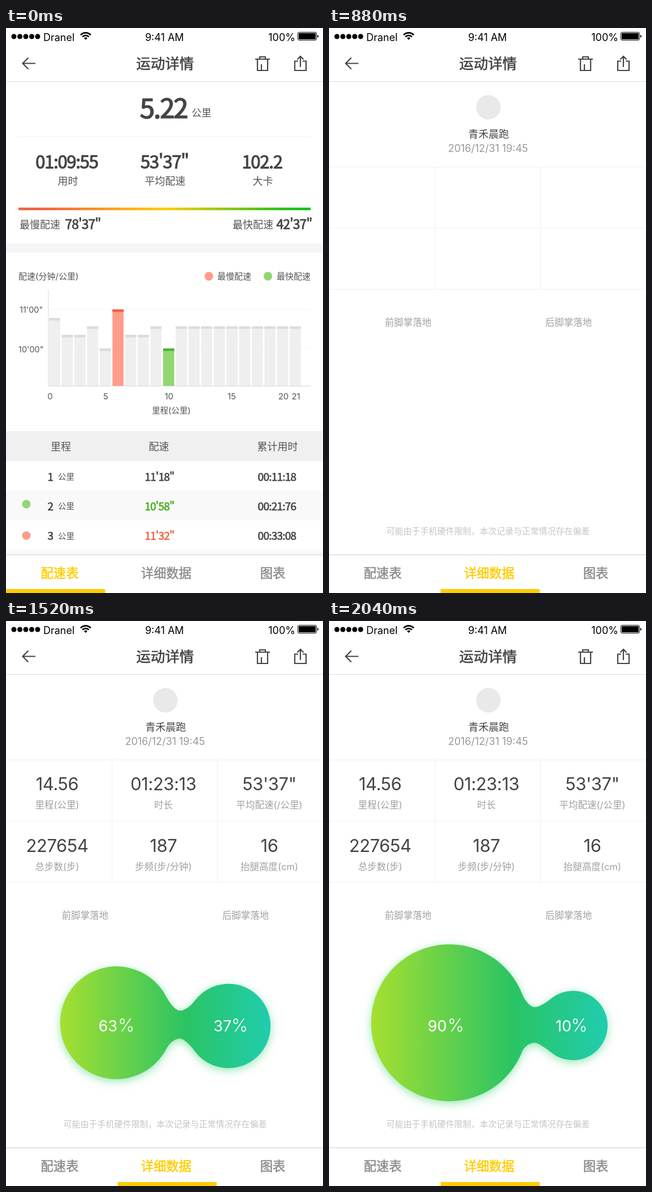
Recreate the animation shown at these times as an HTML page. Size 561 by 998 pixels, loop 3000 ms.

```html
<!DOCTYPE html>
<html lang="zh-CN">
<head>
<meta charset="utf-8">
<title>运动详情</title>
<style>
html, body { margin: 0; width: 100%; height: 100%; overflow: hidden; background: #fff; }
svg { display: block; width: 100vw; height: 100vh; }
text { font-family: Inter, "Noto Sans CJK SC", "Noto Sans CJK", sans-serif; color: #444; fill: currentColor; }
.mid { text-anchor: middle; }
.end { text-anchor: end; }
.bar { font-size: 18px; color: #000; }
.title, .tab, .din { stroke: currentColor; stroke-width: .025em; }
.title { font-size: 25.5px; }
.din { font-family: "Noto Sans CJK SC", "Noto Sans CJK", sans-serif; letter-spacing: -.04em; stroke-width: .035em; }
.s47 { font-size: 47px; }
.s31 { font-size: 31px; }
.s23 { font-size: 23px; }
.s19 { font-size: 19px; }
.s18 { font-size: 18px; }
.s15 { font-size: 15px; }
.s14 { font-size: 14.5px; }
.lab { color: #555; }
.num { font-size: 31px; letter-spacing: -.4px; }
.cap { font-size: 16.5px; color: #a0a0a0; }
.grey { color: #999; }
.hint { font-size: 15px; font-weight: 300; color: #c4c4c4; }
.tab { font-size: 22.3px; color: #8e8e8e; }
.icon { fill: none; stroke: #444; stroke-width: 2.2; }
.pct { font-size: 27px; color: #fff; }
.sign { font-size: 31px; font-weight: 300; }
#blob { fill: url(#lime); filter: drop-shadow(0 4px 8px rgba(50, 210, 110, .5)); }

#pace, #data, #stats, #blob, #share, #line, #tab1, #tab2 { animation: 3s linear infinite; }
#pace { animation-name: leave; }
#data { animation-name: enter; }
#stats { animation-name: rise; }
#blob, #share { animation-name: appear; }
#line { animation-name: move; }
#tab1 { animation-name: off; }
#tab2 { animation-name: on; }
@keyframes leave {
  0%, 18.667% { opacity: 1; animation-timing-function: ease; }
  29.333%, 100% { opacity: 0; }
}
@keyframes enter {
  0%, 18.667% { opacity: 0; animation-timing-function: ease; }
  29.333%, 100% { opacity: 1; }
}
@keyframes rise {
  0%, 33.333% { opacity: 0; transform: translateY(32px); animation-timing-function: ease; }
  44.333%, 100% { opacity: 1; transform: none; }
}
@keyframes appear {
  0%, 33.333% { opacity: 0; animation-timing-function: ease; }
  46.667%, 100% { opacity: 1; }
}
@keyframes move {
  0%, 17.333% { transform: translateX(0); animation-timing-function: ease; }
  28.5%, 100% { transform: translateX(197.5px); }
}
@keyframes off {
  0%, 17.333% { color: #fc0; animation-timing-function: ease; }
  28.5%, 100% { color: #8e8e8e; }
}
@keyframes on {
  0%, 17.333% { color: #8e8e8e; animation-timing-function: ease; }
  28.5%, 100% { color: #fc0; }
}
</style>
</head>
<body>
<svg viewBox="0 0 561 998" preserveAspectRatio="none">
  <defs>
    <linearGradient id="heat">
      <stop offset="0" stop-color="#f0603f"/>
      <stop offset=".08" stop-color="#f0603f"/>
      <stop offset=".5" stop-color="#fc0"/>
      <stop offset=".92" stop-color="#1dbf17"/>
      <stop offset="1" stop-color="#12bf17"/>
    </linearGradient>
    <linearGradient id="lime">
      <stop offset="0" stop-color="#a6df30"/>
      <stop offset=".6" stop-color="#2ac464"/>
      <stop offset="1" stop-color="#20cdaf"/>
    </linearGradient>
  </defs>

  <!-- status bar and header -->
  <g id="dots"></g>
  <text class="bar" x="66" y="22.5">Dranel</text>
  <g fill="none" stroke="#000" stroke-width="2.6">
    <path d="M132 12.2Q141 4.6 150 12.2M135.2 15.6Q141 10.8 146.8 15.6"/>
    <path d="M138 17.8Q141 15.4 144 17.8L141 21Z" fill="#000" stroke="none"/>
  </g>
  <text class="bar mid" x="280.5" y="22.5">9:41 AM</text>
  <text class="bar end" x="512" y="22.5">100%</text>
  <rect x="516.5" y="7.5" width="33" height="14" rx="2.5" fill="none" stroke="#000"/>
  <rect x="518" y="9" width="30" height="11" rx="1" fill="#000"/>
  <path d="M551 12q2 .5 2 2.5t-2 2.5z" fill="#000"/>
  <path class="icon" d="M52 62.5H29.5M39.5 52.5l-10 10 10 10"/>
  <text class="title mid" x="281.5" y="72">运动详情</text>
  <path class="icon" d="M441 55h26M445 55v20h18V55M449 55v-4h10v4M452 64v11"/>
  <path class="icon" d="M517 58.5h-6V75h20V58.5h-6M521 69V50M515.5 55.5l5.5-5.5 5.5 5.5"/>
  <path d="M0 94.5H561" stroke="#dcdcdc"/>

  <g id="pace">
    <text class="din s47" x="237" y="159">5.22</text>
    <text class="lab" font-size="17.5" x="328.5" y="156">公里</text>
    <path d="M22 191.5H539" stroke="#f2f2f2"/>
    <g class="mid">
      <text class="din s31" x="107.5" y="248">01:09:55</text>
      <text class="din s31" x="280.5" y="248">53'37"</text>
      <text class="din s31" x="453" y="248">102.2</text>
      <text class="lab s18" x="109.5" y="277">用时</text>
      <text class="lab s18" x="281.5" y="277">平均配速</text>
      <text class="lab s18" x="454.5" y="277">大卡</text>
    </g>
    <rect x="22" y="317.3" width="517" height="4.5" fill="url(#heat)"/>
    <text class="lab s18" x="24" y="354">最慢配速</text>
    <text class="din s23" x="104.5" y="355">78'37"</text>
    <text class="lab s18" x="401" y="354">最快配速</text>
    <text class="din s23" x="478.5" y="355">42'37"</text>
    <rect y="381" width="560" height="16" fill="#f5f5f5"/>

    <text class="lab s15" x="22" y="443.5">配速(分钟/公里)</text>
    <circle cx="359" cy="438.5" r="7.7" fill="#ff9d8c"/>
    <text class="lab s15" x="374" y="443.5">最慢配速</text>
    <circle cx="463.5" cy="438.5" r="7.7" fill="#92d772"/>
    <text class="lab s15" x="479" y="443.5">最快配速</text>
    <text class="lab s14" x="24" y="502.5">11'00"</text>
    <text class="lab s14" x="22" y="573">10'00"</text>
    <path d="M75 497H539M75 566H539" stroke="#f2f2f2"/>
    <g id="bars"></g>
    <path d="M75 462V632.5H539" fill="none" stroke="#d8d8d8"/>
    <g id="ticks" class="mid"></g>
    <text class="lab s14 mid" x="292.5" y="681">里程(公里)</text>

    <rect y="712" width="560" height="53" fill="#f0f0f0"/>
    <rect y="817" width="560" height="52.5" fill="#f9f9f9"/>
    <rect y="921.5" width="560" height="9" fill="#f9f9f9"/>
    <g class="mid">
      <text class="lab s18" x="97" y="746">里程</text>
      <text class="lab s18" x="270.5" y="746">配速</text>
      <text class="lab s18" x="480.5" y="746">累计用时</text>
    </g>
    <g id="rows"></g>
  </g>

  <g id="data">
    <circle cx="282" cy="140" r="21.7" fill="#e9e9e9"/>
    <text class="s18 mid" x="282.5" y="193.5">青禾晨跑</text>
    <text class="s18 grey mid" x="281.5" y="218.5">2016/12/31 19:45</text>
    <path d="M0 245.5H561M0 353.5H561M0 461.5H561M188 246V461M374.5 246V461" stroke="#efefef"/>
    <text class="cap mid" x="140" y="525.5">前脚掌落地</text>
    <text class="cap mid" x="424" y="525.5">后脚掌落地</text>
    <text class="hint mid" x="281.5" y="893.5">可能由于手机硬件限制，本次记录与正常情况存在偏差</text>
  </g>

  <g id="stats" class="mid"></g>
  <path id="blob"/>
  <g id="share">
    <text id="numL" class="pct end" y="725"></text>
    <text id="signL" class="pct sign" y="725">%</text>
    <text id="numR" class="pct end" y="725"></text>
    <text id="signR" class="pct sign" y="725">%</text>
  </g>

  <!-- tab bar -->
  <rect y="931" width="561" height="67" fill="#fff"/>
  <rect y="929.5" width="561" height="2" fill="#e4e4e4"/>
  <g class="mid">
    <text id="tab1" class="tab" x="95" y="971">配速表</text>
    <text id="tab2" class="tab" x="283.5" y="971">详细数据</text>
    <text class="tab" x="472" y="971">图表</text>
  </g>
  <rect id="line" y="991" width="175.5" height="7" fill="#fc0"/>
</svg>
<script>
const $ = id => document.getElementById(id);
const text = (x, y, s, cls, more = '') => `<text class="${cls}" x="${x}" y="${y}" ${more}>${s}</text>`;
const rect = (x, y, w, h, fill) => `<rect x="${x}" y="${y}" width="${w}" height="${h}" fill="${fill}"/>`;
const circle = (x, y, r, fill) => `<circle cx="${x}" cy="${y}" r="${r}" fill="${fill}"/>`;

$('dots').innerHTML = [0, 1, 2, 3, 4].map(i => circle(14 + i * 10.5, 15, 4.5, '#000')).join('');

const tops = [512, 542, 542, 527, 566, 497, 542, 542, 527, 566];
const tints = { 5: ['#ff9d8c', '#f0603f'], 9: ['#92d772', '#4cb538'] };
$('bars').innerHTML = Array.from({ length: 20 }, (_, i) => {
  const x = 76.2 + i * 22.42, y = tops[i] || 527;
  const [body, lid] = tints[i] || ['#efefef', '#dcdcdc'];
  return rect(x, y, 19.8, 632.5 - y, body) + rect(x, y, 19.8, 4.5, lid);
}).join('');

$('ticks').innerHTML = [[0, 78], [5, 176.5], [10, 288.5], [15, 399.5], [20, 491], [21, 513]]
  .map(([n, x]) => text(x, 655.5, n, 'lab s15')).join('');

$('rows').innerHTML = [
  ["11'18\"", '00:11:18', '#444'],
  ["10'58\"", '00:21:76', '#45ab1c', 841, '#92d772'],
  ["11'32\"", '00:33:08', '#f0603f', 896.5, '#ff9d8c']
].map(([pace, time, ink, dotY, dot], i) => {
  const y = 799.5 + i * 52.4;
  return (dot ? circle(36, dotY, 7.6, dot) : '') +
    text(78.5, y, i + 1, 'din s19 mid') +
    text(92, y - 1.5, '公里', 'lab s14') +
    text(271.5, y, pace, 'din s19 mid', `style="color:${ink}"`) +
    text(479.5, y, time, 'din s19 mid');
}).join('');

$('stats').innerHTML = [
  ['14.56', '里程(公里)'], ['01:23:13', '时长'], ["53'37\"", '平均配速(/公里)'],
  ['227654', '总步数(步)'], ['187', '步频(步/分钟)'], ['16', '抬腿高度(cm)']
].map(([n, label], i) => {
  const x = [90.5, 278.5, 466][i % 3], y = i < 3 ? 299 : 408;
  return text(x, y, n, 'num') + text(x, y + 31.5, label, 'cap');
}).join('');

const mix = (a, b, k) => a + (b - a) * k;
const pt = p => p.map(v => v.toFixed(2)).join(' ');
const ease = q => q + .6 * q * q * (1 - q);

// Joins a circle point to the neck: both handles lean on the crossing of their tangents.
function join(c, r, deg, side, up, neck) {
  const a = deg * Math.PI / 180, cos = Math.cos(a), sin = Math.sin(a);
  const p = [c[0] + side * r * cos, c[1] + up * r * sin];
  const x = p[0] + side * sin * Math.abs(neck[1] - p[1]) / cos;
  const toward = q => [mix(q[0], x, .58), mix(q[1], neck[1], .58)];
  return { p, h: toward(p), n: toward(neck) };
}

function blobPath(q) {
  const L = [mix(187, 213, q), 709.7], R = [mix(375.5, 431.7, q), mix(715.7, 714.5, q)];
  const rl = mix(81, 138.5, q), rr = mix(80.8, 61.3, q);
  const al = mix(30, 21.8, q), ar = mix(30, 50.5, q), nx = mix(281.5, 364, q);
  const top = [nx, 692 - 10 * ease(q)], low = [nx, mix(734, 745, q)];
  const lt = join(L, rl, al, 1, -1, top), rt = join(R, rr, ar, -1, -1, top);
  const lb = join(L, rl, al, 1, 1, low), rb = join(R, rr, ar, -1, 1, low);
  return `M${pt(lt.p)}C${pt(lt.h)} ${pt(lt.n)} ${pt(top)}C${pt(rt.n)} ${pt(rt.h)} ${pt(rt.p)}` +
    `A${rr} ${rr} 0 1 1 ${pt(rb.p)}C${pt(rb.h)} ${pt(rb.n)} ${pt(low)}` +
    `C${pt(lb.n)} ${pt(lb.h)} ${pt(lb.p)}A${rl} ${rl} 0 1 1 ${pt(lt.p)}Z`;
}

function drawShare(t) {
  const q = Math.min(1, Math.max(0, (t - 1285) / 725));
  const left = Math.round(50 + 40 * q), e = ease(q);
  $('blob').setAttribute('d', blobPath(q));
  $('numL').textContent = left;
  $('numR').textContent = 100 - left;
  $('numL').setAttribute('x', mix(190.5, 208.5, e));
  $('signL').setAttribute('x', mix(191.5, 210, e));
  $('numR').setAttribute('x', mix(382, 429, e));
  $('signR').setAttribute('x', mix(382, 428.5, e));
}

// One clock in 40 ms ticks drives the keyframes and the blob alike.
const LOOP = 3000, TICK = 40, start = performance.now();
const moves = document.getAnimations();
moves.forEach(m => m.pause());

function frame() {
  const t = Math.floor((performance.now() - start) % LOOP / TICK) * TICK;
  moves.forEach(m => { m.currentTime = t; });
  drawShare(t);
  requestAnimationFrame(frame);
}
frame();
</script>
</body>
</html>
```
